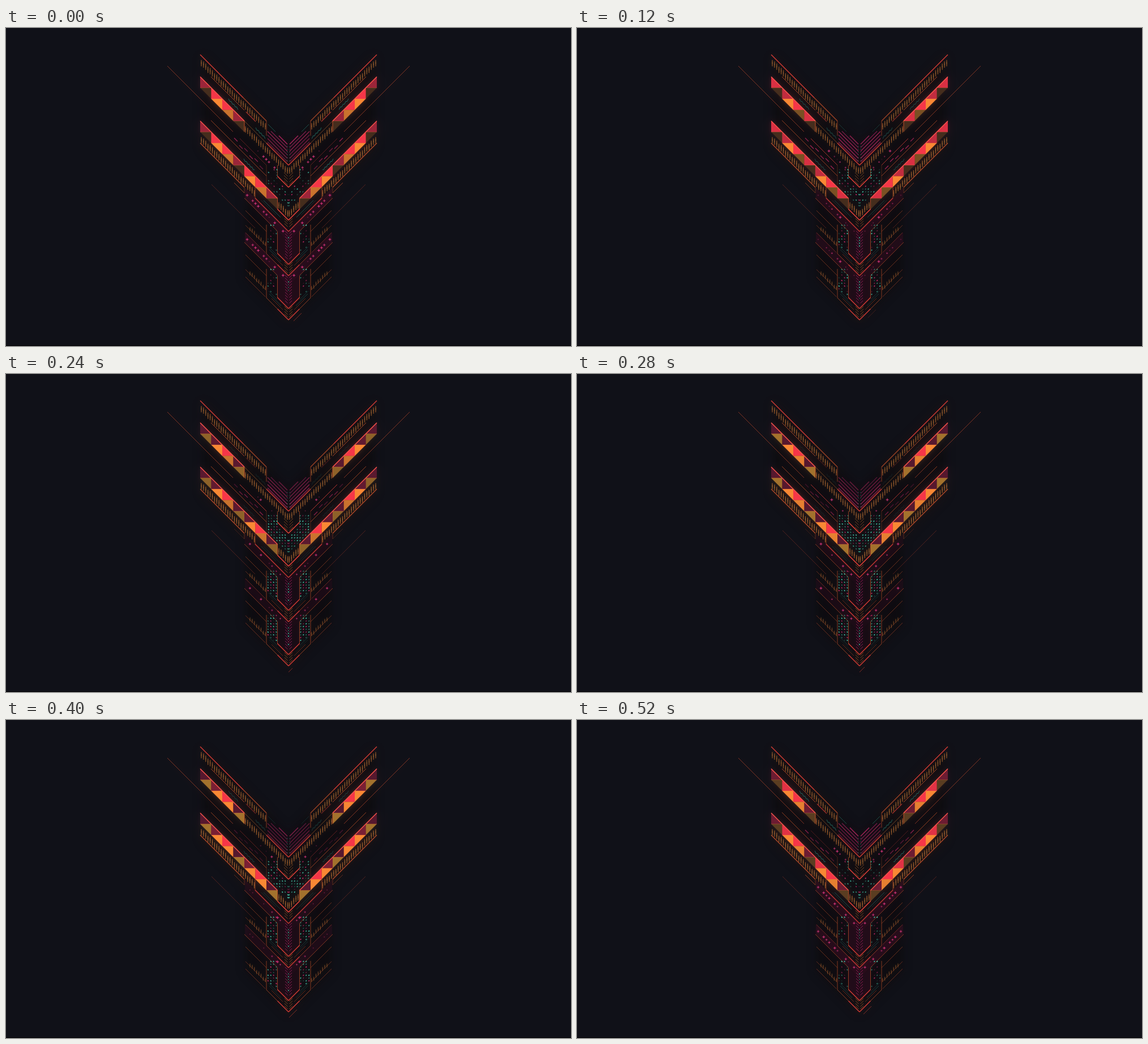
Write an HTML page with a canvas that moves like this. It is 998x561 px and loops after 0.56 s.

```html
<!DOCTYPE html>
<html lang="en">
<head>
<meta charset="utf-8">
<title>Neon chevrons</title>
<style>
html, body { margin: 0; width: 100%; height: 100%; overflow: hidden; background: #101118; }
canvas { display: block; }
</style>
</head>
<body>
<canvas id="stage" width="998" height="561"></canvas>
<script>
const W = 998, H = 561, CX = 499;
const UNIT = 19.5, CELL = UNIT / 4;
const STEPS = 14, STEP_MS = 40, MODULE = 78;

const RED = '#f0443a', ORANGE = '#d0562d', GOLD = '#a5602a';
const PINK = '#d82c70', TEAL = '#30b5a0';

const stage = document.getElementById('stage').getContext('2d');
const layer = document.createElement('canvas');
layer.width = W;
layer.height = H;
const g = layer.getContext('2d');

const clamp = v => Math.max(0, Math.min(1, v));
const hash = n => { const s = Math.sin(n * 127.1 + 3.7) * 43758.5453; return s - Math.floor(s); };
const wave = (step, peak) => 0.5 + 0.5 * Math.cos((step - peak) / STEPS * 2 * Math.PI);
const mix = (a, b, k) => `rgb(${a.map((v, i) => Math.round(v + (b[i] - v) * k))})`;

// All geometry is for one half: d is the distance from the axis,
// v the height at which a diagonal meets it.
function segment(d1, y1, d2, y2, color, width = 1, alpha = 1) {
  g.globalAlpha = clamp(alpha);
  g.strokeStyle = color;
  g.lineWidth = width;
  g.beginPath();
  g.moveTo(d1, y1);
  g.lineTo(d2, y2);
  g.stroke();
}

function diagonal(v, outer, inner, color, width, alpha) {
  segment(outer, v - outer, inner, v - inner, color, width, alpha);
}

function upright(d, top, bottom, color = ORANGE, alpha = 0.7) {
  segment(d, top, d, bottom, color, 1, alpha);
}

function shape(points, color, alpha = 1) {
  g.globalAlpha = alpha;
  g.fillStyle = color;
  g.beginPath();
  points.forEach(p => g.lineTo(...p));
  g.closePath();
  g.fill();
}

function ticks(v, length, outer, inner, alpha = 0.85) {
  const gap = UNIT / 5;
  for (let i = 0, d = outer; d >= inner; i++, d -= gap) {
    const top = v - d + (i % 3 ? 0 : 1.5);
    segment(d, top, d, top + length, GOLD, 1.3, alpha);
    segment(d, top + length * 0.3, d, top + length * 0.65, '#e0a05c', 0.8, alpha * 0.5);
  }
}

function plus(d, y, level) {
  if (level < 0.08) return;
  const r = 0.9 + 1.6 * level;
  segment(d - r, y, d + r, y, '#e83a86', 1.1, level);
  segment(d, y - r, d, y + r, '#e83a86', 1.1, level);
}

function triangles(v, count, step) {
  const reds = [wave(step, 2) ** 4, wave(step, 0.5) ** 1.2, 1];
  const golds = [wave(step, 8.5), 1, 1 - (1 - wave(step, 10)) ** 2];
  const shadows = [[56, 36, 27], [249, 136, 52], [122, 80, 35]];
  const lights = [[176, 123, 47], [249, 136, 52], [249, 136, 52]];
  for (let i = 0; i < count; i++) {
    const left = 156 - i * UNIT, right = left - UNIT;
    const top = v - left, mid = top + UNIT, low = mid + UNIT;
    const kind = i % 3;
    const upper = mix([86, 24, 46], [246, 54, 72], reds[kind]);
    const lower = mix(shadows[kind], lights[kind], golds[kind]);
    shape([[left, top], [left, mid], [right, mid]], upper);
    shape([[left, mid], [right, mid], [right, low]], lower);
    segment(left, mid, right, mid, '#ee6d3a', 0.7, 0.5);
    segment(right, mid, right, low, '#ee6d3a', 0.6, 0.4);
  }
}

function zigzag(v, outer, inner, alpha) {
  g.globalAlpha = alpha;
  g.strokeStyle = TEAL;
  g.lineWidth = 0.8;
  g.beginPath();
  for (let d = outer, i = 0; d >= inner; d -= 2.4, i++) g.lineTo(d, v - d + (i % 2 ? 1.3 : -1.3));
  g.stroke();
}

function dot(d, y, seed, step, strength = 1) {
  const level = clamp((wave(step, 7) * 0.6 + hash(seed) - 0.58) * 3);
  const twinkle = 0.4 + 0.5 * wave(step, hash(seed + 50) * STEPS);
  const color = hash(seed + 9) > 0.78 ? PINK : '#48d2b4';
  segment(d + 0.8, y - 0.8, d - 0.8, y + 0.8, color, 1.7, level * twinkle * strength);
}

function herringbone(from, to, gap, color, alpha, reach = 6) {
  for (let v = from; v <= to; v += gap) diagonal(v, reach, 1.5, color, 1, alpha);
}

function dashes(v, outer, inner, step, color, alpha) {
  for (let i = 0, d = outer; d > inner + 4; i++, d -= 9) {
    diagonal(v + (i % 2) * 4, d, d - 6, color, 1.1, alpha * (0.3 + 0.7 * wave(step, hash(i + v) * 4)));
  }
}

function wings(step) {
  diagonal(203, 156, 80, RED, 1.3, 0.9);
  diagonal(203, 80, 39, ORANGE, 1.1, 0.8);
  upright(39, 164, 190, ORANGE, 0.6);
  ticks(209, 11, 154, 40, 0.8);
  diagonal(223, 137, 78, ORANGE, 1, 0.75);
  diagonal(223, 75, 58, RED, 1.1, 0.2 + 0.5 * wave(step, 0));
  diagonal(281, 214, 98, '#a8402a', 0.9, 0.8);

  triangles(242, 4, step);
  diagonal(242, 156, 78, '#ff554b', 1.4);
  diagonal(242, 78, 39, GOLD, 1, 0.6);
  diagonal(242, 39, 0, RED, 1.2, 0.9);
  upright(78, 164, 183);
  ticks(248, 11, 76, 0, 0.8);

  const teal = 0.15 + 0.5 * wave(step, 0);
  zigzag(232, 106, 88, teal);
  zigzag(235, 58, 40, teal);
  zigzag(311, 79, 58, teal);
}

function crown(step) {
  for (let i = 0; i < 6; i++) {
    const reach = Math.min(37, 17 + i * 14);
    diagonal(207 + i * 6.2, reach, 2, i % 2 ? '#a92463' : PINK, 1.1, 0.5 + 0.35 * wave(step, i));
  }
  diagonal(206, 36, 23, TEAL, 0.8, 0.5 * wave(step, 0));
  herringbone(211, 236, 5, TEAL, 0.5, 3);
  diagonal(281, 86, 39, RED, 1, 0.25 + 0.5 * wave(step, 5));
  diagonal(300, 137, 39, ORANGE, 1, 0.65);
  upright(39, 242, 276, ORANGE, 0.3);
  dashes(290, 96, 38, step, PINK, 0.75);
  upright(UNIT, 242, 262, ORANGE, 0.6);
  diagonal(281, UNIT, 0, RED, 1.2);
  herringbone(263, 278, 5, GOLD, 0.6, 8);

  const peaks = [3, 7, 0.5, 13.5, 1, 9, 1];
  peaks.forEach((peak, i) => {
    const d = 54 - i * CELL;
    plus(d, 271 - d, wave(step, peak) ** 3 * 0.9);
  });

  for (let c = 0; c < 8; c++) {
    const d = 1 + c * CELL;
    const top = d < UNIT ? 288 - d : 250;
    for (let y = 250, r = 0; y < 316 - d; y += CELL, r++) {
      if (y >= top) dot(d, y, c * 23 + r, step);
    }
  }
}

function lowerBand(step) {
  triangles(320, 7, step);
  diagonal(320, 156, UNIT, '#ff554b', 1.3);
  upright(UNIT, 300, 320);
  diagonal(339, UNIT, 0, RED, 1.4);
  ticks(323, 11, 17, 0);
  ticks(345, 11, 154, 60);
  diagonal(359, 156, 78, ORANGE, 1.1, 0.9);
  upright(59, 281, 300, ORANGE, 0.6);
  upright(78, 281, 291, ORANGE, 0.4);
  diagonal(359, 59, 0, RED, 1.2, 0.85);
  diagonal(348, 44, 14, TEAL, 0.8, 0.15 + 0.35 * wave(step, 0));
  diagonal(352, 48, 22, TEAL, 0.7, 0.25);
  diagonal(369, 96, 78, ORANGE, 1, 0.2 + 0.5 * wave(step, 0));
}

function bodyModule(y, step) {
  const power = wave(step, 0);
  const tint = 0.1 + 0.1 * power;
  shape([[77, y + 282], [77, y + 301], [0, y + 378], [0, y + 359]], '#74123c', tint);
  shape([[UNIT, y + 359], [UNIT, y + 398], [0, y + 417], [0, y + 378]], '#74123c', tint * 0.8);

  diagonal(y + 378, 78, UNIT, ORANGE, 1, 0.55);
  upright(UNIT, y + 359, y + 398, ORANGE, 0.65);
  diagonal(y + 417, UNIT, 0, RED, 1.2, 0.9);
  diagonal(y + 398, 76, 39, ORANGE, 0.9, 0.5);
  upright(39, y + 347, y + 398, ORANGE, 0.6);
  diagonal(y + 437, 39, UNIT, ORANGE, 1, 0.65);
  diagonal(y + 437, UNIT, 0, RED, 1.2, 0.9);
  diagonal(y + 437, 76, 41, '#a23d29', 0.9, 0.65);
  diagonal(y + 424, 76, 40, ORANGE, 0.8, 0.5);
  ticks(y + 418, 7, 68, 40, 0.5);
  diagonal(y + 425, 34, 13, TEAL, 0.8, 0.15 + 0.25 * power);
  diagonal(y + 429, 30, 10, ORANGE, 0.8, 0.5);
  diagonal(y + 421, 35, 20, TEAL, 0.8, 0.3);

  herringbone(y + 364, y + 412, 5, '#b2246c', 0.7);
  for (let i = 0; i < 9; i++) dot(0, y + 365 + i * CELL, i + 91, step, 0.6);
  herringbone(y + 420, y + 434, 4.5, GOLD, 0.7, 7);

  const peaks = [0, 7, 13, 0.5, 0, 5, 13, 1, 3, 8, 0, 10, 8, 0];
  peaks.forEach((peak, i) => {
    const d = 73 - i * CELL;
    plus(d, y + 368 - d, wave(step, peak) ** 3 * 0.9);
  });

  for (let c = 0; c < 4; c++) {
    for (let r = 0; r < 10; r++) {
      const d = 21.5 + c * CELL, top = y + 348 + r * CELL;
      if (top < y + 420 - d && top > y + 368 - d) dot(d, top, c * 17 + r + 310, step);
    }
  }
}

function tail(step) {
  const p = (step + 8) % STEPS, head = 7 + 2 * p;
  diagonal(526, head, Math.max(0, head - 14), '#c53f30', 0.9, p < 9 ? 0.65 : (13 - p) * 0.13);
}

function drawHalf(step) {
  wings(step);
  crown(step);
  lowerBand(step);
  herringbone(343, 355, 4.5, GOLD, 0.7, 7);
  diagonal(412, 136, 59, '#983826', 0.8, 0.55);
  bodyModule(0, step);
  bodyModule(MODULE, step);
}

function backdrop() {
  stage.fillStyle = '#101118';
  stage.fillRect(0, 0, W, H);
  stage.save();
  stage.filter = 'blur(8px)';
  stage.fillStyle = 'rgba(9,6,9,0.5)';
  stage.translate(CX, 0);
  stage.beginPath();
  const half = [[0, 200], [152, 50], [152, 212], [76, 290], [76, 442], [0, 518]];
  half.forEach(([d, y]) => stage.lineTo(d, y));
  half.reverse().forEach(([d, y]) => stage.lineTo(-d, y));
  stage.fill();
  stage.restore();
}

function glow(radius, alpha) {
  stage.save();
  stage.globalCompositeOperation = 'lighter';
  stage.globalAlpha = alpha;
  stage.filter = `blur(${radius}px)`;
  stage.drawImage(layer, 0, 0);
  stage.restore();
}

function render(step) {
  g.setTransform(1, 0, 0, 1, 0, 0);
  g.clearRect(0, 0, W, H);
  for (const side of [-1, 1]) {
    g.setTransform(side, 0, 0, 1, CX, 0);
    drawHalf(step);
  }
  tail(step);
  backdrop();
  glow(11, 0.2);
  glow(3, 0.14);
  stage.drawImage(layer, 0, 0);
  stage.fillStyle = '#030304';
  stage.fillRect(0, H - 1, W, 1);
}

let shown = -1;
function tick(now) {
  const step = Math.floor(now / STEP_MS) % STEPS;
  if (step !== shown) render(shown = step);
  requestAnimationFrame(tick);
}
render(shown = 0);
requestAnimationFrame(tick);
</script>
</body>
</html>
```
